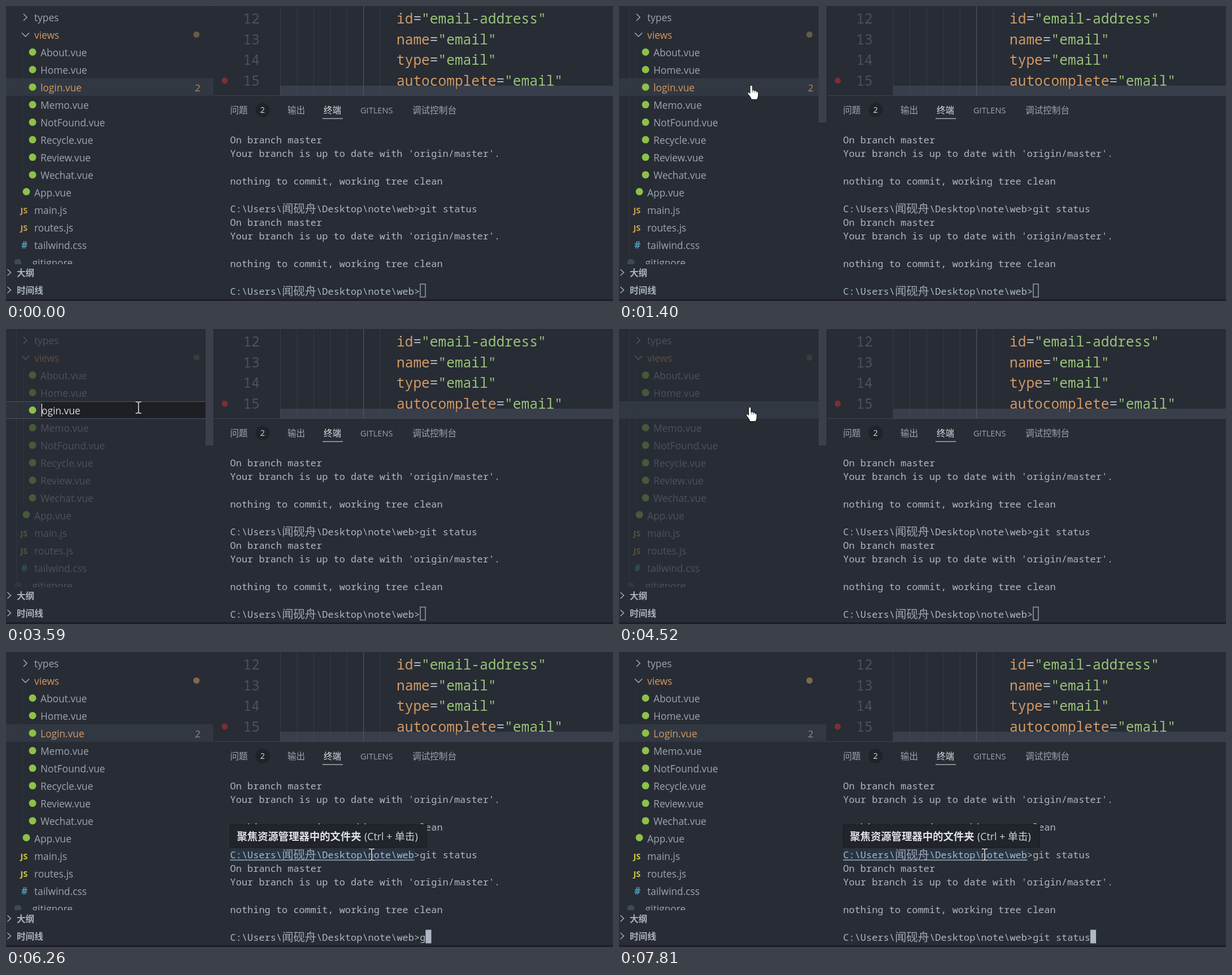
An HTML page that plays this animation: 1074x522 px, repeating every 8 s.

```html
<!DOCTYPE html>
<html lang="zh">
<head>
<meta charset="utf-8">
<title>Editor and terminal</title>
<style>
  html, body { margin: 0; width: 100%; height: 100%; overflow: hidden; background: #282c34; }
  svg { display: block; width: 1074px; height: 522px; }
  text { font-family: "Open Sans", "Noto Sans CJK SC", "Noto Sans CJK", sans-serif; font-size: 17.3px; fill: #9da5b4; white-space: pre; }
  .mono { font-family: "Noto Sans Mono", "Noto Sans CJK SC", monospace; font-size: 16.95px; font-weight: 500; fill: #b0b7c3; }
  .cjk { font-family: "Noto Sans CJK SC", "Noto Sans CJK", sans-serif; font-weight: 300; font-size: 20.34px; fill: #a0a7b3; }
  .code { font-family: "Noto Sans Mono", monospace; font-size: 24.5px; font-weight: 500; }
  .tab { font-size: 15.6px; }
  .line { fill: none; stroke: #abb2bf; stroke-width: 1.4; }
</style>
</head>
<body>
<svg id="stage" viewBox="0 0 1074 522"></svg>
<script>
const LOOP = 8000, ROW = 31.02, CELL = 10.17, TERM_X = 396.6, LINE = 24.33;
const USER = '闻砚舟', ORANGE = '#d19a66', BRIGHT = '#d7dae0', GREEN = '#8dc149';
const stage = document.getElementById('stage');

function el(tag, attrs, parent = stage) {
  const node = document.createElementNS('http://www.w3.org/2000/svg', tag);
  for (const key in attrs) node.setAttribute(key, attrs[key]);
  parent.append(node);
  return node;
}
const group = (parent) => el('g', {}, parent);
const rect = (x, y, width, height, fill, parent) => el('rect', { x, y, width, height, fill }, parent);
const dot = (cx, cy, r, fill, parent) => el('circle', { cx, cy, r, fill }, parent);
const path = (d, attrs, parent) => el('path', { d, ...attrs }, parent);
function text(x, y, content, attrs = {}, parent) {
  const node = el('text', { x, y, ...attrs }, parent);
  node.textContent = content;
  return node;
}
const show = (node, on) => node.setAttribute('visibility', on ? 'visible' : 'hidden');
const paint = (node, fill) => node.style.fill = fill;
const at = (steps, t) => steps.reduce((last, step) => step[0] <= t ? step : last);
const ramp = (t, from, to) => Math.max(0, Math.min(1, (t - from) / (to - from)));
const termY = row => 243 + row * LINE;

// Explorer
rect(0, 0, 1074, 522, '#282c34');
const band = rect(0, 128, 367, 31, '#323842');
const hoverGuide = rect(18, 0, 1, 445, '#323740');
rect(30.5, 67, 1, 249, '#31363f');
const tree = group();
const treeY = i => 26.5 + i * ROW;

path('M31 14L37 20L31 26', { class: 'line' }, tree);
text(50, treeY(0), 'types', {}, tree);
path('M28 47.5L34.5 54L41 47.5', { class: 'line' }, tree);
text(50, treeY(1), 'views', { style: `fill:${ORANGE}` }, tree);
const folderDot = dot(337, 50.5, 5.5, '#655c48', tree);

['About', 'Home', '', 'Memo', 'NotFound', 'Recycle', 'Review', 'Wechat'].forEach((name, i) => {
  if (!name) return;
  dot(47, 81.5 + i * ROW, 6.5, GREEN, tree);
  text(61, treeY(i + 2), name + '.vue', {}, tree);
});
dot(36, 328.5, 6.5, GREEN, tree);
text(50, treeY(10), 'App.vue', {}, tree);
const jsIcons = ['main.js', 'routes.js'].map((name, i) => {
  text(50, treeY(11 + i), name, {}, tree);
  return text(25.5, treeY(11 + i) - 1, 'JS', { style: 'font-size:14.5px;font-weight:700' }, tree);
});
text(27, treeY(13) - 1, '#', { style: 'font-weight:700;fill:#519aba' }, tree);
text(50, treeY(13), 'tailwind.css', {}, tree);
dot(21, 454, 6.5, '#3c4a52', tree);
text(42, treeY(14), '.gitignore', {}, tree);

// Row being renamed
const outline = path('M0 128.5H367M0 158.5H367', { stroke: '#4b5364' });
const field = rect(61, 129, 305, 29, '#1d1f23');
const selection = rect(62, 131, 41, 25, '#0a5fd6');
const fileIcon = dot(47, 143.5, 6.5, GREEN);
const fileName = text(61, treeY(4), '');
const badge = text(334.5, treeY(4), '2', { style: 'font-size:16.5px' });
const caret = rect(0, 132, 1.5, 23, BRIGHT);

const scrollbar = rect(353, 0, 14, 206, '#3a3f4a');
rect(0, 457, 367, 65, '#282c34');
[['大纲', 472], ['时间线', 503]].forEach(([label, y]) => {
  path(`M2.5 ${y - 6}L8.5 ${y - .5}L2.5 ${y + 5}`, { class: 'line' });
  text(19, y + 5.5, label, { class: 'tab', style: 'font-weight:700;fill:#abb2bf' });
});
rect(367.5, 0, 1, 519, '#262a32');

// Code editor
for (let i = 0; i < 7; i++) rect(485 + i * 29.45, 0, 1, 158, i == 5 ? '#565c69' : '#383d46');
dot(387, 132, 5.5, '#7c2e34');
[['id', 'email-address'], ['name', 'email'], ['type', 'email'], ['autocomplete', 'email']].forEach(([key, value], i) => {
  const y = 31.3 + i * 36.5;
  text(419.5, y, 12 + i, { class: 'code', style: 'fill:#495162' });
  const line = text(691, y, '', { class: 'code' });
  [[key, ORANGE], ['=', '#abb2bf'], [`"${value}"`, '#98c379']].forEach(([part, fill]) => {
    el('tspan', { style: `fill:${fill}` }, line).textContent = part;
  });
});
rect(485, 141, 589, 17, 'rgba(78,86,102,.45)');
rect(368, 158, 706, 1, '#3e4452');

// Panel tabs
[[396.5, '问题'], [498, '输出'], [562, '终端'], [719, '调试控制台']].forEach(([x, label]) =>
  text(x, 190, label, { class: 'tab', style: label == '终端' ? `fill:${BRIGHT}` : '' }));
text(627, 190, 'GITLENS', { style: 'font-size:14.6px' });
dot(454, 184, 12.7, '#1f2329');
text(454, 189, '2', { 'text-anchor': 'middle', style: `font-size:14.5px;fill:${BRIGHT}` });
rect(560, 198.6, 36, 1.2, '#c3c8d1');

// Terminal
const linkShade = rect(TERM_X, 348, 326, 22, 'rgba(38,79,120,.25)');
const term = (row, content, column = 0) => text(TERM_X + column * CELL, termY(row), content, { class: 'mono' });
function prompt(row) {
  term(row, 'C:\\Users\\');
  text(TERM_X + 9 * CELL, termY(row) + 1.5, USER, { class: 'cjk' });
  term(row, '\\Desktop\\note\\web>', 15);
}
[0, 6].forEach(row => {
  term(row, 'On branch master');
  term(row + 1, "Your branch is up to date with 'origin/master'.");
  term(row + 3, 'nothing to commit, working tree clean');
});
prompt(5);
term(5, 'git status', 33);
prompt(11);
const command = term(11, '', 33);
const block = rect(0, 491.5, CELL, 24, '#b0b7c3');
const hollow = el('rect', { x: 733, y: 492, width: 9, height: 23, fill: 'none', stroke: '#b0b7c3', 'stroke-width': 1.2 });
const underline = rect(TERM_X, 367.5, 326, 1.3, '#b0b7c3');

const tooltip = group();
el('rect', { x: 396.5, y: 305.5, width: 348, height: 40, fill: '#21252b', stroke: '#181a1f' }, tooltip);
text(408.5, 333, '聚焦资源管理器中的文件夹', { style: 'font-size:18.35px;font-weight:700;fill:#dfe2e8' }, tooltip);
text(634, 333, '(Ctrl + 单击)', { style: 'font-size:17.8px;fill:#cdd1d9' }, tooltip);
rect(0, 519, 1074, 3, '#211b2b');

// Mouse pointers
const hand = group();
path('M-2.2 2Q0-1.8 2.2 2V9Q5 7.8 6 10Q9 9 9.6 11.2Q12.5 11 12.5 13.8V18Q12.5 21 10.3 25.5H.5Q-1 21-6 15.5Q-7 12.3-4.5 12.5L-2.2 14.5Z',
  { fill: '#fff', stroke: '#111', 'stroke-width': 1 }, hand);
path('M2.4 9V13M6 10V13.5M9.5 11.5V14', { stroke: '#333', 'stroke-width': .8 }, hand);
const beam = group();
const beamPath = 'M-5-10H-1.5L0-9L1.5-10H5M0-9V9M-5 10H-1.5L0 9L1.5 10H5';
path(beamPath, { fill: 'none', stroke: '#14161a', 'stroke-width': 3 }, beam);
path(beamPath, { fill: 'none', stroke: '#f0f0f0', 'stroke-width': 1.5 }, beam);

// Timeline: [start ms, values...]
const pointer = [
  [0, null, 0, 0],
  [390, beam, 876, 468], [460, beam, 800, 432], [530, beam, 680, 382], [590, beam, 550, 326], [660, beam, 464, 292],
  [1000, beam, 456, 284], [1070, beam, 420, 252], [1130, beam, 372, 214], [1200, hand, 318, 182], [1270, hand, 275, 160],
  [1340, hand, 247, 146], [1400, hand, 234, 140], [1470, hand, 233, 137], [1540, hand, 232, 133], [1740, hand, 232, 128],
  [1870, hand, 231, 124], [2010, beam, 234.5, 139], [4520, hand, 231.5, 138], [5250, hand, 245, 150],
  [5310, hand, 290, 185], [5380, beam, 400, 240], [5450, beam, 520, 300], [5520, beam, 600, 340], [5590, beam, 640, 356],
  [5660, beam, 647, 358.5]
];
const rowMode = [[0, 'idle'], [1870, 'focus'], [2410, 'edit'], [4450, 'blank'], [5180, 'focus'], [5860, 'idle']];
const edits = [[0, 'login', -9], [2810, 'login', 62.5], [3060, 'login', 67.5], [3590, 'ogin', 62.5], [3990, 'Login', 72]];
const keys = [6260, 6460, 6600, 6870, 6990, 7210, 7340, 7460, 7660, 7810];

function draw(t) {
  const mode = at(rowMode, t)[1], edit = mode == 'edit', focus = mode == 'focus', blank = mode == 'blank';
  const [, name, caretX] = at(edits, t);
  const renamed = t >= 5180;

  tree.setAttribute('opacity', edit || blank ? .3 : 1);
  paint(folderDot, renamed ? '#83674f' : '#655c48');
  jsIcons.forEach(icon => paint(icon, renamed ? '#cbcb41' : '#c9a052'));
  paint(band, edit || focus ? '#2c313a' : '#323842');
  show(outline, edit || focus);
  show(field, edit);
  show(selection, edit && t < 2810);
  show(caret, edit && t >= 2810);
  caret.setAttribute('x', caretX);
  show(fileIcon, !blank);
  show(fileName, !blank);
  fileName.textContent = name + '.vue';
  fileName.setAttribute('x', edit ? 63 : 61);
  paint(fileName, edit || focus ? BRIGHT : ORANGE);
  show(badge, !edit && !blank);
  paint(badge, focus ? BRIGHT : '#b58a60');

  const overTree = t >= 1200 && t < 5380;
  show(hoverGuide, overTree);
  scrollbar.setAttribute('opacity', t < 1200 ? 0 : 1 - ramp(t, 5450, 6150));

  const typed = keys.filter(k => k <= t).length;
  command.textContent = 'git status'.slice(0, typed);
  block.setAttribute('x', TERM_X + (33 + typed) * CELL);
  show(block, t >= 5860);
  show(hollow, t < 5860);
  show(underline, t >= 5660);
  show(linkShade, t >= 6080);
  tooltip.setAttribute('opacity', ramp(t, 6020, 6220));

  const [, kind, x, y] = at(pointer, t);
  [hand, beam].forEach(p => show(p, p == kind));
  if (kind) kind.setAttribute('transform', `translate(${x} ${y})`);
}

const start = performance.now();
function tick() {
  draw((performance.now() - start) % LOOP);
  requestAnimationFrame(tick);
}
tick();
</script>
</body>
</html>
```
